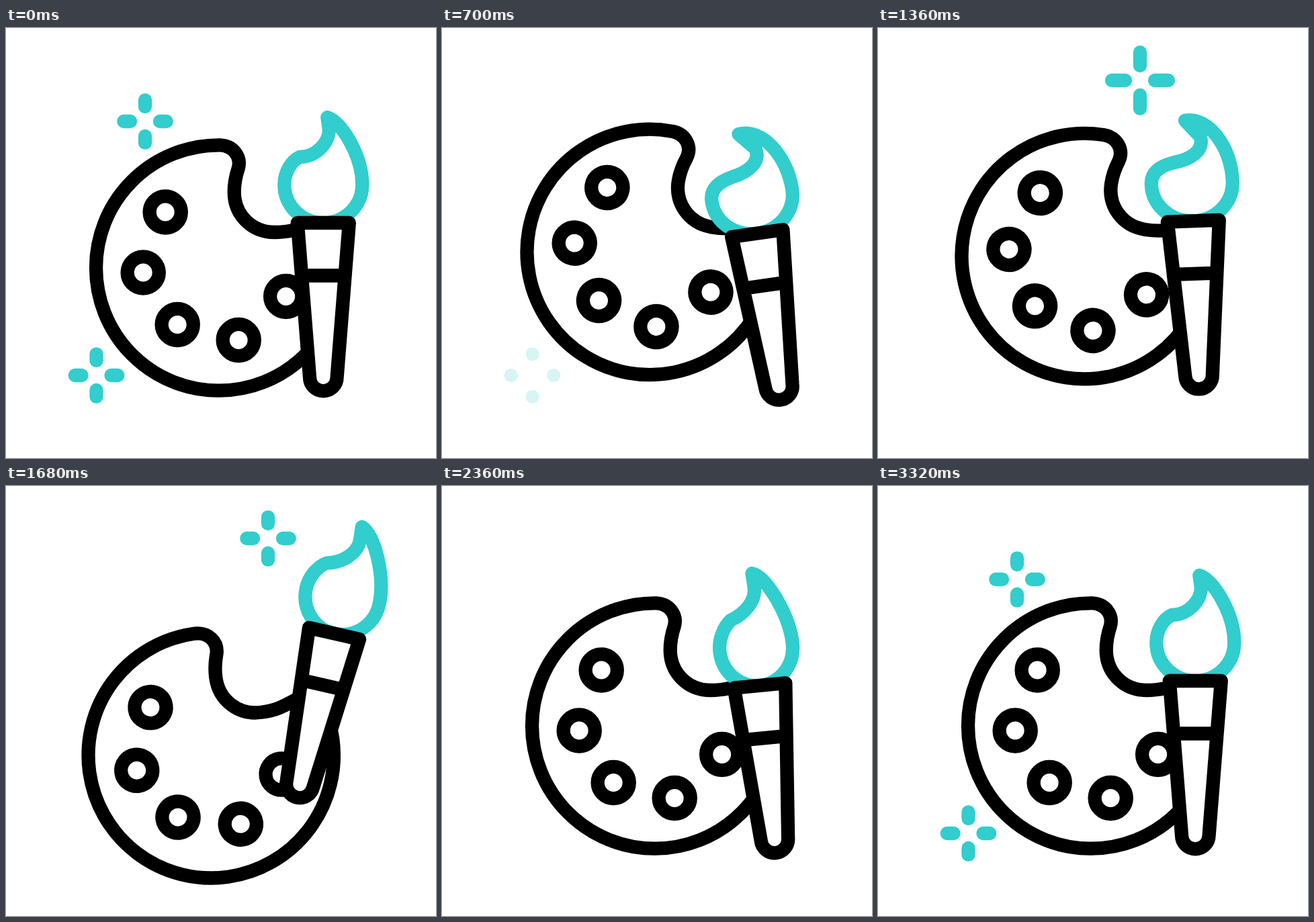
These frames come from a looping animation (640 by 640 pixels, 3600 ms). An HTML page:

```html
<!DOCTYPE html>
<html lang="en">
<head>
<meta charset="utf-8">
<title>Palette and brush</title>
<style>
  html, body { margin: 0; width: 100%; height: 100%; overflow: hidden; background: #fff; }
  svg { display: block; width: 100%; height: 100%; }
  path, circle { fill: #fff; stroke: #000; stroke-width: 20.3; stroke-linecap: round; stroke-linejoin: round; }
  .teal { stroke: #32cdcd; }
</style>
</head>
<body>
<svg viewBox="0 0 640 640">
  <g id="sparkles"></g>
  <g id="palette">
    <path d="M182.7 0A182.7 182.7 0 1 1 0-182.7H2C21-182 34-166 29-148C25-136 23-125 23-113C23-79 49-53 83-53C108-53 118-58 138-65C163-71 182-37 182.7 0Z"/>
  </g>
  <g id="brush">
    <path id="bristle" class="teal"/>
    <path d="M-38.5 0H38.5L20.3 230A20.3 20.3 0 0 1-20.3 230ZM-32 78.5H32"/>
  </g>
</svg>
<script>
const LOOP = 3600;
const el = id => document.getElementById(id);
const clamp = v => Math.max(0, Math.min(1, v));
const ramp = (t, from, to) => clamp((t - from) / (to - from));
const ease = (t, from, to) => { const u = ramp(t, from, to); return u * u * (3 - 2 * u); };

function add(parent, tag, attrs) {
  const node = document.createElementNS('http://www.w3.org/2000/svg', tag);
  for (const name in attrs) node.setAttribute(name, attrs[name]);
  return parent.appendChild(node);
}

for (const [cx, cy] of [[-79.5, -83], [-112.5, 7], [-61.5, 84.5], [29.5, 107.5], [100, 42.5]])
  add(el('palette'), 'circle', { cx, cy, r: 23.6 });

// The palette and brush swing in opposition; each key is time, x, y, angle
const SWING = {
  palette: [[380, 0, 0, 0], [700, -7.5, -23.5, 10.3], [1000, -12, -50, 16], [1360, -9.5, -17.5, 8.8],
    [1590, -38, 67, -14], [1680, -11.5, 44, -8], [2040, -24.5, -35, 5], [2300, 0, 0, 0]],
  brush: [[380, 0, 0, 0], [700, -3, 15.5, -8], [1000, 2, 40, -14], [1360, -3, -2.5, -2.1],
    [1590, 38, -92, 18], [1680, 16.3, -70.7, 12.9], [2040, 3.3, 17.8, -14], [2600, 0, 0, 0]]
};

// Cubic through the keys, flat at turning points and at rest
function sample(keys, k, t) {
  const slope = i => keys[i] && keys[i + 1] ?
    (keys[i + 1][k] - keys[i][k]) / (keys[i + 1][0] - keys[i][0]) : 0;
  const tangent = i => {
    const a = slope(i - 1), b = slope(i);
    return a * b > 0 ? 2 * a * b / (a + b) : 0;
  };
  const i = keys.findIndex((key, n) => keys[n + 1] && t >= key[0] && t < keys[n + 1][0]);
  if (i < 0) return 0;
  const [from, to] = [keys[i], keys[i + 1]];
  const span = to[0] - from[0], u = (t - from[0]) / span;
  return from[k] + (to[k] - from[k]) * ease(u, 0, 1) +
    span * u * (1 - u) * ((1 - u) * tangent(i) - u * tangent(i + 1));
}

function place(id, homeX, homeY, t) {
  const [x, y, angle] = [1, 2, 3].map(k => sample(SWING[id], k, t));
  el(id).setAttribute('transform', `translate(${homeX + x} ${homeY + y}) rotate(${angle})`);
}

// A round body with a flame tip; bend curls the tip over, stretch pulls it tall
function bristle(bend, stretch) {
  const mix = (rest, bent, tall) => rest + bend * bent + stretch * tall;
  const w = mix(58, 2.5, -9);
  const tip = [mix(6, -13, -4), mix(-157, 7, -26)];
  const spur = [mix(8, 7, -6), mix(-143, 18, -9)];
  const knob = [mix(-35, 9, 3), mix(-98, 10, -7)];
  const off = ([x, y], dx, dy) => [x + dx, y + dy];
  return `M${tip}
    C${off(tip, mix(20, 15, 3), mix(5, -10, 3))} ${w} ${mix(-100, -8, 5)} ${w} -57
    C${w} -25 ${w * .55} 0 0 0
    C${-w * .55} 0 ${-w} -25 ${-w} -57
    C${-w} -75 ${off(knob, mix(-13, -7, 5), mix(6, -2, 7))} ${knob}
    C${off(knob, mix(25, 1, -9), mix(0, -4, -20))} ${off(spur, mix(4, 1, -8), 21)} ${spur}Z`;
}

// Sparkles shoot out, settle, shrink to dots and fade
const sparkles = [[207, 139, 2648, 1052], [134.5, 517, 3040, 1020], [390, 78, 1200, 640]]
  .map(([x, y, start, life]) => ({
    start, life,
    node: add(el('sparkles'), 'path', { class: 'teal', transform: `translate(${x} ${y})` })
  }));

function drawSparkle({ node, start, life }, t) {
  const age = (t - start + LOOP) % LOOP;
  const near = 22 * ramp(age, 0, 136) + 9.7 * ramp(age, life, life + 160);
  const far = 42 * ramp(age, 0, 160) - 10.3 * ramp(age, 160, 280);
  node.setAttribute('d', `M${near} 0H${far}M${-near} 0H${-far}M0 ${near}V${far}M0 ${-near}V${-far}`);
  node.setAttribute('opacity', 1 - ramp(age, life + 160, life + 260));
}

function draw(t) {
  place('palette', 316.7, 357, t);
  place('brush', 472.3, 290, t);
  const bend = ease(t, 380, 700) - ease(t, 1360, 1590);
  const stretch = ease(t, 1500, 2040) - ease(t, 2040, 2600);
  el('bristle').setAttribute('d', bristle(bend, stretch));
  sparkles.forEach(s => drawSparkle(s, t));
}

const begin = performance.now();
function tick() {
  draw((performance.now() - begin) % LOOP);
  requestAnimationFrame(tick);
}
tick();
</script>
</body>
</html>
```
